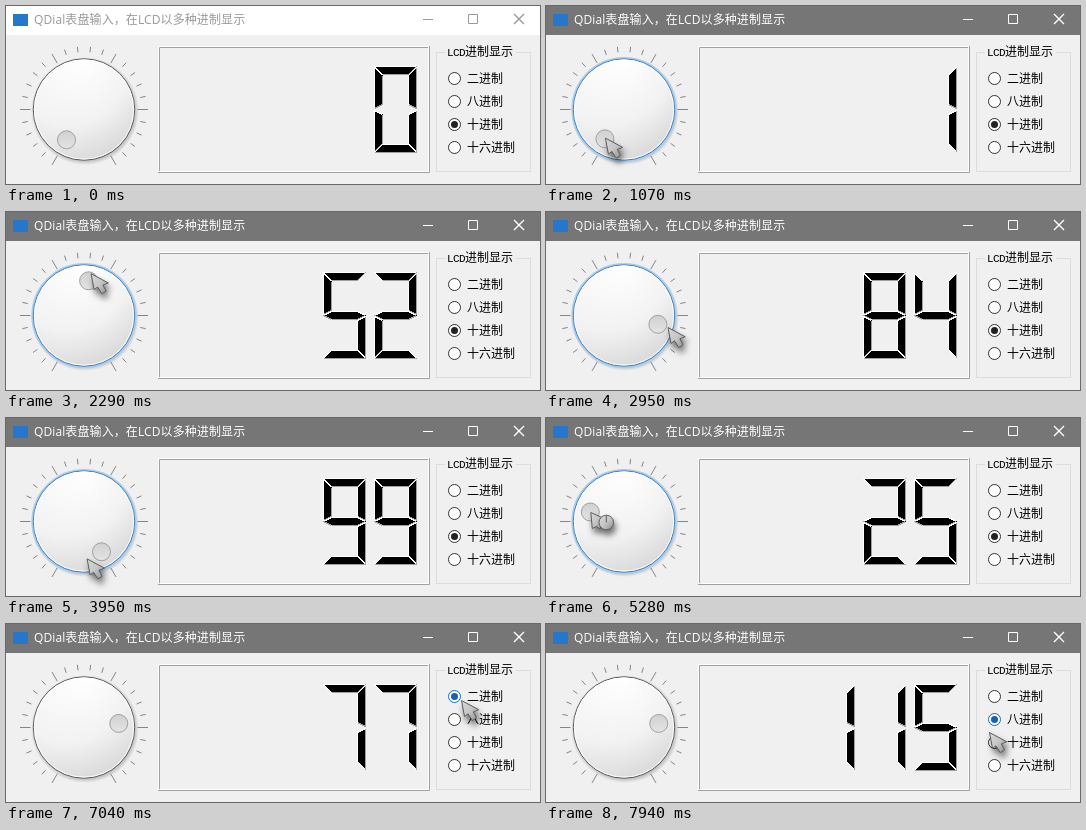
An HTML page that plays this animation: 534x178 px, repeating every 8 s.

```html
<!DOCTYPE html>
<html lang="zh-CN">
<head>
<meta charset="utf-8">
<title>QDial</title>
<style>
html, body { margin: 0; width: 100%; height: 100%; overflow: hidden; background: #f0f0f0; }
svg { display: block; width: 534px; height: 178px; }
text { font: 12px "Noto Sans CJK SC", "Noto Sans CJK", sans-serif; white-space: pre; }
#caption { font-family: "Open Sans", "Noto Sans CJK SC", "Noto Sans CJK", sans-serif; letter-spacing: .1px; }
.mono { font: 11px "Liberation Mono", monospace; letter-spacing: -.6px; }
#cursor { filter: drop-shadow(2px 5px 3px rgba(0,0,0,.55)); }
</style>
</head>
<body>
<svg viewBox="0 0 534 178" xmlns="http://www.w3.org/2000/svg">
  <defs>
    <radialGradient id="face" gradientUnits="userSpaceOnUse" cx="44" cy="52" r="132" fx="78" fy="53">
      <stop offset="0" stop-color="#fff"/><stop offset=".5" stop-color="#f2f2f2"/><stop offset="1" stop-color="#ccc"/>
    </radialGradient>
    <linearGradient id="grip" x1="0" y1="0" x2="0" y2="1">
      <stop offset="0" stop-color="#d0d0d0"/><stop offset="1" stop-color="#e4e4e4"/>
    </linearGradient>
    <linearGradient id="metal" x1="0" y1="0" x2="1" y2="1">
      <stop offset="0" stop-color="#d8d8d8"/><stop offset=".5" stop-color="#c6c6c6"/><stop offset="1" stop-color="#8c8c8c"/>
    </linearGradient>
    <radialGradient id="shade">
      <stop offset=".88" stop-color="#000" stop-opacity=".3"/><stop offset="1" stop-color="#000" stop-opacity="0"/>
    </radialGradient>
  </defs>

  <rect width="534" height="178" fill="#f0f0f0"/>
  <rect id="bar" width="534" height="29"/>
  <rect x="7" y="8" width="15" height="12" fill="#2478cc"/>
  <text id="caption" x="28" y="18">QDial表盘输入，在LCD以多种进制显示</text>
  <g id="buttons" fill="none">
    <path d="M417 13.5h10M462.5 8.5h9v9h-9z"/>
    <path stroke-width="1.3" d="M508 8l10 10M518 8l-10 10"/>
  </g>

  <g fill="none">
    <path stroke="#fff" d="M152.5 167V40.5H423M422.5 42V165.5H154"/>
    <path stroke="#a0a0a0" d="M153.5 165V41.5H422M423.5 40V166.5H152"/>
    <rect x="430.5" y="46.5" width="94" height="119" stroke="#dcdcdc"/>
  </g>
  <rect x="439" y="40" width="71" height="12" fill="#f0f0f0"/>
  <text class="mono" x="441" y="50">LCD</text>
  <text x="459" y="50">进制显示</text>

  <path id="ticks" fill="none" stroke="#858585"/>
  <circle cx="79" cy="105" r="54" fill="url(#shade)"/>
  <circle id="halo" cx="78" cy="103.5" r="51.6" fill="none" stroke="#a9cdee" stroke-width="2"/>
  <circle id="body" cx="78" cy="103.5" r="50.7" fill="url(#face)"/>
  <circle cx="78" cy="103.5" r="49.6" fill="none" stroke="#fff" stroke-opacity=".85"/>
  <circle id="knob" r="9" fill="url(#grip)" stroke="#a0a0a0"/>

  <g id="lcd" shape-rendering="crispEdges"></g>
  <g id="radios"></g>

  <g id="cursor" fill="url(#metal)" stroke="#5c5c5c" stroke-linejoin="round">
    <path id="arrow" d="M.5.5L3.5 16.5L7 13.8L11.2 20.5L15.5 18L12.4 11.8L17.8 9.8Z"/>
    <g id="busy">
      <path d="M.5.5L2 16.5L6 14.5L10 17L11.5 5.5Z"/>
      <circle cx="16" cy="10.5" r="7.3"/>
      <path d="M16 4v6.5" fill="none"/>
    </g>
  </g>
</svg>

<script>
const $ = id => document.getElementById(id);
const set = (el, attrs) => { for (const k in attrs) el.setAttribute(k, attrs[k]); };
const show = (el, on) => set(el, { visibility: on ? "visible" : "hidden" });
const mix = (a, b, k) => a.map((v, i) => v + (b[i] - v) * k);
function add(parent, tag, attrs) {
  const el = document.createElementNS("http://www.w3.org/2000/svg", tag);
  set(el, attrs);
  return parent.appendChild(el);
}

const LOOP = 8000, BEGIN = 300, STEP = 110.4;
const GRAB = 960, DROP = 5900, ARRIVE = 6373, TO_BIN = 6720, LEAVE = 7280, TO_OCT = 7470, END = 7918;
const CX = 78, CY = 103.5, MAX = 99;

function polar(deg, r) {
  const a = deg * Math.PI / 180;
  return [CX + r * Math.cos(a), CY - r * Math.sin(a)];
}

// Dragging goes clockwise, twice around: time, angle, radius
const DRAG = [
  [GRAB, 236, 34], [1735, 161.2, 41], [2949, -14.8, 45], [3510, -56, 43], [3700, -56, 43],
  [3943, -86, 37], [4390, -118, 48], [4700, -118, 48], [5268, -195.8, 35], [DROP, -353.5, 40]
];

function drag(t) {
  const i = Math.max(1, DRAG.findIndex(d => d[0] >= t));
  const a = DRAG[i - 1], b = DRAG[i];
  return mix(a, b, (t - a[0]) / (b[0] - a[0])).slice(1);
}

const clamp = (v, lo, hi) => Math.max(lo, Math.min(hi, v));
const span = (t, a, b) => clamp((t - a) / (b - a), 0, 1);

function pointer(t) {
  if (t < GRAB) return mix([250, 170], polar(...drag(GRAB)), span(t, BEGIN, GRAB));
  if (t < DROP) return polar(...drag(t));
  const k = span(t, DROP, ARRIVE);
  const [x, y] = mix(polar(...drag(DROP)), [455, 76], k);
  return mix([x, y + 20 * Math.sin(Math.PI * k)], [443, 108], span(t, LEAVE, END));
}

// The value follows the angle and falls back to 0 past the bottom
function dialValue(t) {
  if (t < GRAB) return 0;
  const [deg] = drag(Math.min(t, DROP));
  const a = deg < -90 ? deg + 360 : deg;
  return clamp(Math.round((240 - a) * MAX / 300), 0, MAX);
}

// Dial notches, every fifth one long
let notches = "";
for (let i = 0; i <= 25; i++) {
  const [r0, r1] = i % 5 ? [57.5, 63] : [53.5, 64];
  notches += `M${polar(240 - i * 12, r0)}L${polar(240 - i * 12, r1)}`;
}
set($("ticks"), { d: notches });

// Seven bevelled segments, corners clockwise
const S = 43, W = 8, H = 4, E = S - 1, B = 2 * S;
const flipX = pts => pts.map(([x, y]) => [E - x, y]).reverse();
const flipY = pts => pts.map(([x, y]) => [x, B - y]).reverse();
const top7 = [[0, 0], [E, 0], [E - W, W], [W, W]];
const side = [[0, 1], [W, W + 1], [W, S - H - 1], [0, S - 1]];
const middle = [[0, S], [W, S - H], [E - W, S - H], [E, S], [E - W, S + H], [W, S + H]];
const SEGS = [top7, side, flipX(side), middle, flipY(side), flipY(flipX(side)), flipY(top7)];
const GLYPHS = ["012456", "25", "02346", "02356", "1235", "01356", "013456", "025", "0123456", "012356"];

// Digit cells from right to left; edges facing up or left are lit
const cells = [0, 1, 2].map(i => {
  const g = add($("lcd"), "g", { transform: `translate(${368.5 - i * 51} 60.5)` });
  return SEGS.map(pts => {
    const seg = add(g, "g", {});
    add(seg, "polygon", { points: pts.join(" "), fill: "#000" });
    pts.forEach(([x1, y1], j) => {
      const [x2, y2] = pts[(j + 1) % pts.length];
      add(seg, "line", { x1, y1, x2, y2, stroke: y2 - y1 <= x2 - x1 ? "#fff" : "#a0a0a0" });
    });
    return seg;
  });
});

function drawNumber(str) {
  cells.forEach((segs, i) => {
    const c = str[str.length - 1 - i];
    segs.forEach((seg, j) => show(seg, c !== undefined && GLYPHS[c].includes(j)));
  });
}

const radios = ["二进制", "八进制", "十进制", "十六进制"].map((label, i) => {
  const y = 73 + i * 23, g = $("radios");
  const ring = add(g, "circle", { cx: 448.5, cy: y - .5, r: 6, fill: "#fff" });
  const dot = add(g, "circle", { cx: 448.5, cy: y - .5, r: 3.5 });
  add(g, "text", { x: 461, y: y + 4 }).textContent = label;
  return { y, ring, dot };
});

function render(now) {
  const time = now % LOOP;
  const t = time < BEGIN ? 0 : BEGIN + Math.floor((time - BEGIN) / STEP) * STEP;
  const [x, y] = pointer(t);

  const active = t >= 630, focus = t >= 740 && t < TO_BIN;
  set($("bar"), { fill: active ? "#767676" : "#fff" });
  set($("caption"), { fill: active ? "#fff" : "#999" });
  set($("buttons"), { stroke: active ? "#fff" : "#999" });

  const value = dialValue(t);
  const [cx, cy] = polar(240 - value * 300 / MAX, 35);
  set($("knob"), { cx, cy });
  set($("body"), { stroke: focus ? "#427fb8" : "#5a5a5a" });
  show($("halo"), focus);

  // Binary is too long for the display, so the old number stays
  drawNumber(value.toString(t >= TO_OCT ? 8 : 10));

  const chosen = t >= TO_OCT ? 1 : t >= TO_BIN ? 0 : 2;
  const hover = x > 440 ? radios.findIndex(r => Math.abs(y - r.y) <= 12) : -1;
  radios.forEach((r, i) => {
    set(r.ring, { stroke: i === hover ? "#0f6fc0" : "#333" });
    set(r.dot, { fill: i === hover ? "#1464b0" : "#222" });
    show(r.dot, i === chosen);
  });

  const seen = t >= BEGIN, wait = t >= 4700 && t <= ARRIVE;
  set($("cursor"), { transform: `translate(${x.toFixed(1)} ${y.toFixed(1)})` });
  show($("arrow"), seen && !wait);
  show($("busy"), seen && wait);
}

const start = performance.now();
function tick() {
  render(performance.now() - start);
  requestAnimationFrame(tick);
}
tick();
</script>
</body>
</html>
```
